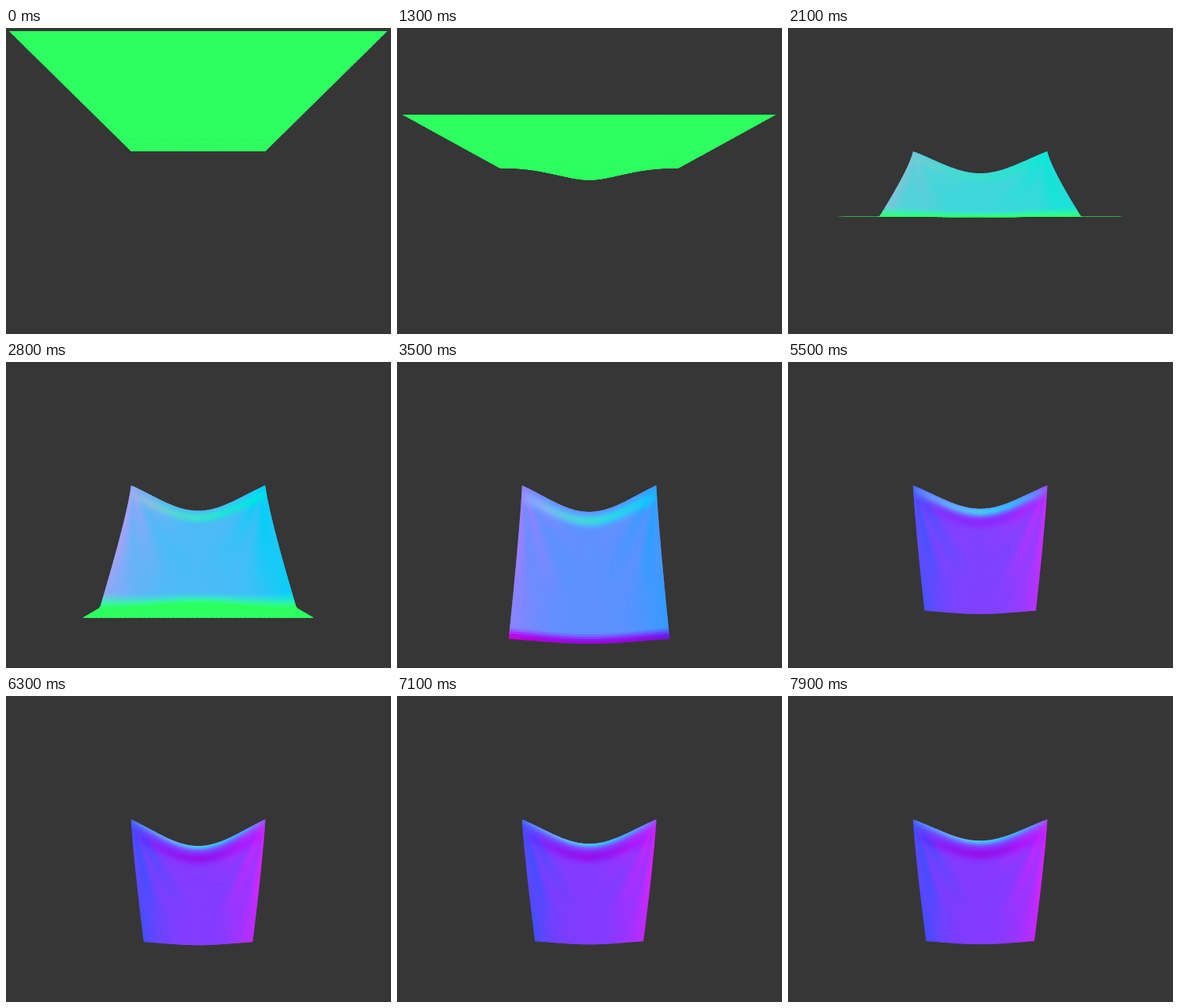
Animation of 492x392 px, one loop 8 s. Source, as an HTML page with a canvas:

```html
<!DOCTYPE html>
<html lang="en">
<head>
<meta charset="utf-8">
<title>Falling cloth</title>
<style>
html, body { margin: 0; width: 100%; height: 100%; overflow: hidden; background: #363636; }
canvas { display: block; }
</style>
</head>
<body>
<canvas id="stage" width="492" height="392"></canvas>
<script>
const ctx = document.getElementById('stage').getContext('2d');
const LOOP = 8000, COLS = 48, ROWS = 72;

// The cloth is a 2 by 2 square, pinned at its two far corners
const FOCAL = 266, CENTER = 245.6, HORIZON = 242.6;
const PIN_Y = 0.987, PIN_Z = 3.1, SIDE = 2, TAUT = 2.8;

const mix = (a, b, k) => a + (b - a) * k;
const clamp = (x, a, b) => Math.min(b, Math.max(a, x));
const smooth = (a, b, x) => {
  const k = clamp((x - a) / (b - a), 0, 1);
  return k * k * (3 - 2 * k);
};
const bump = x => Math.exp(-x * x);
const fall = t => 0.346 * t * t / (1 + 0.263 * t);

// Free edge relative to the pins: falls against the air, then swings through
function freeEdge(t) {
  const tau = Math.max(0, t - TAUT);
  const length = 2.034 + 0.12 * (1 - Math.exp(-3 * tau));
  if (!tau) {
    const drop = fall(t);
    return { drop, reach: Math.min(SIDE, Math.sqrt(length ** 2 - drop ** 2)) };
  }
  const reach = -0.75 + 2.05 * Math.exp(-0.55 * tau - 0.2 * tau * tau);
  return { drop: Math.sqrt(length ** 2 - reach ** 2), reach };
}

function draw(t) {
  const { drop, reach } = freeEdge(t);
  const sag = Math.min(drop, 0.36 + 0.04 * Math.cos(2 * Math.PI * (t - 6.4) / 3.1));
  const belly = 0.06 * smooth(2.9, 3.3, t);

  // the part that still falls flat shrinks as the pull of the pins spreads
  const flat = Math.max(0, SIDE - 0.6 * t);
  const flatMid = flat && Math.min(reach, flat * 1.6);
  const kink = clamp(1 - flat / SIDE, 0.02, 1);

  const point = (u, v) => {
    const s = 1 - Math.abs(2 * u - 1);
    const bell = (1 - Math.cos(Math.PI * s)) / 2;
    const arc = mix(bell, 1 - (1 - s) ** 2, 0.6);
    const flatHere = mix(flat, flatMid, bell ** 1.5);
    const k = Math.min(1, v / kink);
    const rest = v > kink ? (v - kink) / (1 - kink) : 0;
    const y = PIN_Y - mix(sag * arc, drop + belly * arc, k);
    const z = PIN_Z - (reach - flatHere) * k ** 1.2 - flatHere * rest;
    const scale = FOCAL / z;
    return [CENTER + (2 * u - 1) * scale, HORIZON - y * scale];
  };

  // surface normal: lean of the sheet, a roll under the sag, a hem and creases
  const lean = (reach - flat) / Math.hypot(reach - flat, drop || 1);
  const late = smooth(4.7, 6, t), hanging = smooth(1.5, 2.5, t);
  const cup = clamp(reach / 2.1, -0.4, 0.4);
  const hemNow = bump((t - 3.5) / 0.35);

  const color = (u, v) => {
    const side = 2 * u - 1, s = 1 - Math.abs(side);
    const level = smooth(kink - 0.08, kink, v) * smooth(0, 0.25, flat);
    const roll = bump((v - 0.08 * (1 - late)) / mix(0.05, 0.035, late)) * s ** 0.4 * hanging;
    const under = bump((v - 0.11) / 0.05) * Math.sqrt(s) * late;
    const crease = Math.sin(Math.atan2(s, v + 0.04) * 11 + 1)
      * (1 - s) * (1 - smooth(0.45, 0.8, v)) * smooth(0, 0.12, v);

    let ny = mix(lean, 0.85, 0.85 * roll) - 0.3 * under;
    ny = mix(ny, -0.7, hemNow * smooth(0.93, 0.99, v));
    ny = clamp(mix(ny, 1, level), -1, 1);
    const nz = Math.sqrt(1 - ny * ny);
    const tilt = cup * Math.abs(side) ** 1.5 + 0.4 * roll;
    const nx = (0.1 * crease - side * tilt) * hanging * (1 - level);

    const rgb = [0.43 - 0.25 * ny + 0.7 * nx, 0.43 + 0.57 * ny - 0.2 * nx, 0.376 + 0.7 * nz];
    return `rgb(${rgb.map(c => Math.round(255 * clamp(c, 0, 1)))})`;
  };

  ctx.fillStyle = '#363636';
  ctx.fillRect(0, 0, 492, 392);
  for (let j = 0; j < ROWS; j++) {
    const v0 = j / ROWS, v1 = Math.min(1, (j + 1.6) / ROWS);
    for (let i = 0; i < COLS; i++) {
      // cells overlap a little so that no seams show
      const u0 = i / COLS, u1 = Math.min(1, (i + 1.6) / COLS);
      ctx.fillStyle = color((i + 0.5) / COLS, (j + 0.5) / ROWS);
      ctx.beginPath();
      for (const [u, v] of [[u0, v0], [u1, v0], [u1, v1], [u0, v1]]) ctx.lineTo(...point(u, v));
      ctx.fill();
    }
  }
}

const start = performance.now();
function tick() {
  const t = (performance.now() - start) % LOOP;
  draw(Math.floor(t / 100) / 10);
  requestAnimationFrame(tick);
}
tick();
</script>
</body>
</html>
```
